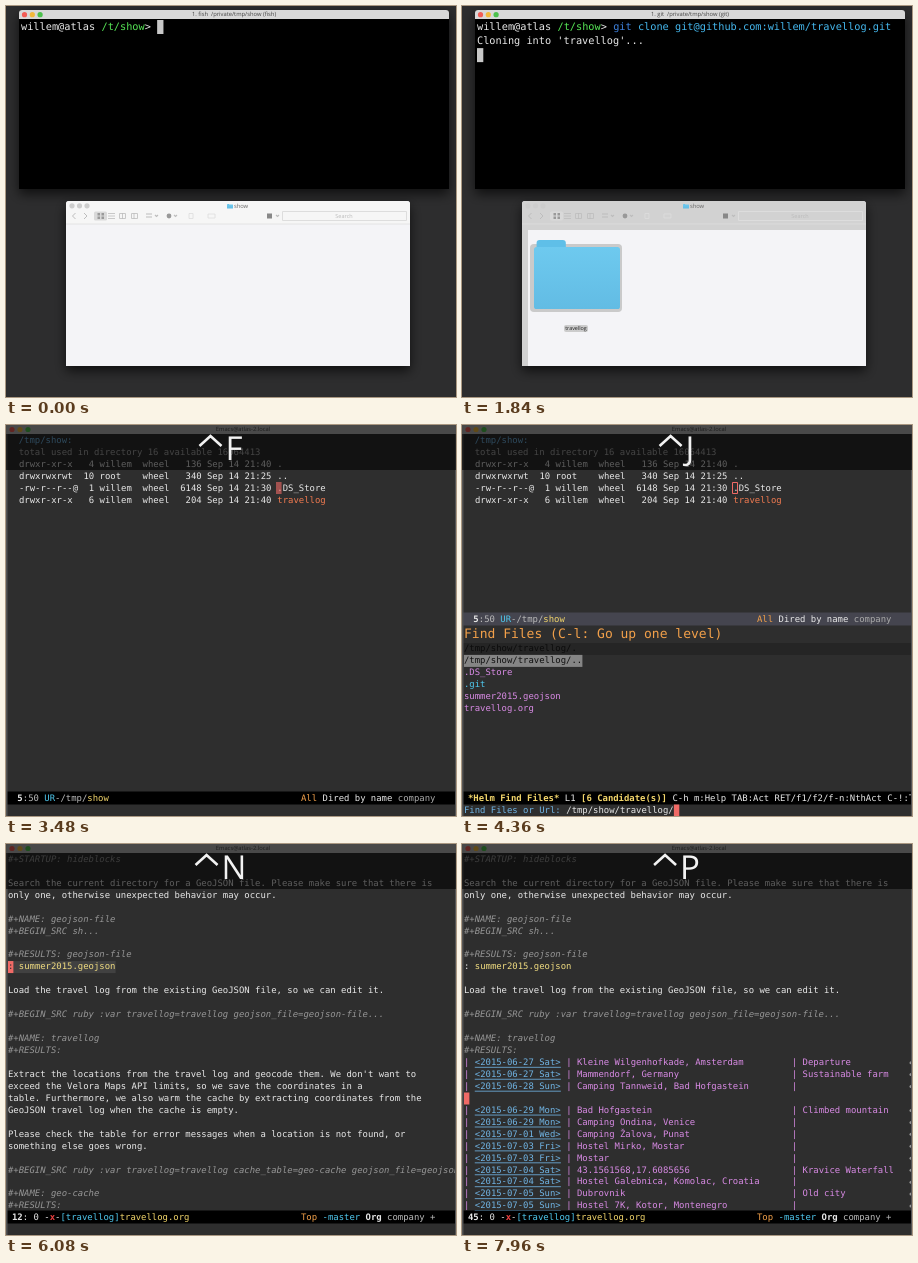
An HTML page with a canvas that plays this animation: 450x391 px, repeating every 8 s.

```html
<!DOCTYPE html>
<html lang="en">
<head>
<meta charset="utf-8">
<title>Travel log demo</title>
<style>
html, body { margin: 0; width: 100%; height: 100%; overflow: hidden; background: #2d2d2e; }
canvas { display: block; width: 450px; height: 391px; }
</style>
</head>
<body>
<canvas id="stage" width="450" height="391"></canvas>
<script>
const g = document.getElementById('stage').getContext('2d');
const MONO = '"DejaVu Sans Mono", monospace', SANS = '"Open Sans", sans-serif';
const WHITE = '#e8e8e8', GRAY = '#969696', VIOLET = '#d88ae4', BLUE = '#70b4e4', CYAN = '#4fc9ef',
  GOLD = '#f3d66b', ORANGE = '#f2a04a', RED = '#f06a66', BG = '#2e2e2e';
const LOOP = 8000, EM = 8.94, CW = EM * 0.602;

function box(x, y, w, h, fill) { g.fillStyle = fill; g.fillRect(x, y, w, h); }
function shape(fill, ...args) {
  g.fillStyle = fill;
  g.beginPath();
  g.roundRect(...args);
  g.fill();
}
function dot(x, y, r, fill) {
  g.fillStyle = fill;
  g.beginPath();
  g.arc(x, y, r, 0, 7);
  g.fill();
}
function path(d, color, width) {
  g.strokeStyle = color;
  g.lineWidth = width;
  g.stroke(new Path2D(d));
}
function label(s, x, y, size, color, align = 'center') {
  g.font = `${size}px ${SANS}`;
  g.textAlign = align;
  g.fillStyle = color;
  g.fillText(s, x, y);
}
// Monospaced line made of [text, colour, style] spans
function line(x, y, spans, size = EM) {
  g.textAlign = 'left';
  for (const [s, color = WHITE, style = ''] of spans) {
    const w = s.length * size * 0.602;
    g.font = `${style === 'link' ? '' : style} ${size}px ${MONO}`;
    g.fillStyle = color;
    g.fillText(s, x, y);
    if (style === 'link') g.fillRect(x, y + 4.2, w, 0.8);
    x += w;
  }
}

/* ---------- terminal and file window ---------- */

const PROMPT = [['willem@atlas '], ['/t/show', '#56e656'], ['> ']];
const COMMAND = 'git clone git@github.com:willem/travellog.git';
const OUTPUT = [
  [1640, "Cloning into 'travellog'..."],
  [2000, 'remote: Counting objects: 121, done.'],
  [2080, 'remote: Compressing objects: 100% (110/110), done.'],
  [2160, 'remote: Total 121 (delta 38), reused 86 (delta 3), pack-reused 0'],
  [2280, 'Receiving objects: 100% (121/121), 21.26 KiB | 0 bytes/s, done.'],
  [2360, 'Resolving deltas: 100% (38/38), done.'],
  [2440, 'Checking connectivity... done.'],
];

function panel(x, y, w, h, fill) {
  g.save();
  g.shadowColor = '#000a';
  g.shadowBlur = 12;
  g.shadowOffsetY = 5;
  shape(fill, x, y, w, h, [3, 3, 0, 0]);
  g.restore();
}
function lights(x, y, step, colors) { colors.forEach((c, i) => dot(x + i * step, y, 2.6, c)); }

function terminal(t) {
  panel(13, 4, 430, 179, '#000');
  shape('#d8d8d8', 13, 4, 430, 9, [3, 3, 0, 0]);
  lights(18.5, 8.7, 7.8, ['#f25c55', '#f2b93c', '#4cc04c']);
  const busy = t >= 1640 && t < 2520, app = busy ? 'git' : 'fish';
  label(`1. ${app}  /private/tmp/show (${app})`, 228, 8.8, 5.8, '#444');

  const size = 10.28, cw = size * 0.602, y = n => 21 + n * 14.06;
  const n = Math.max(0, Math.min(COMMAND.length, Math.ceil((t - 20) / 35)));
  line(15, y(0), [...PROMPT, [COMMAND.slice(0, Math.min(n, 3)), '#3f83e0'],
    [COMMAND.slice(3, Math.max(n, 3)), '#45b8ee']], size);
  const lines = OUTPUT.filter(o => t >= o[0]);
  lines.forEach((o, i) => line(15, y(i + 1), [[o[1]]], size));
  let row = lines.length ? lines.length + 1 : 0, col = lines.length ? 0 : 22 + n;
  if (t >= 2520) {
    line(15, y(row), PROMPT, size);
    col = 22;
  }
  const cx = 15 + col * cw, cy = y(row) - 7;
  if (t >= 2600) path(`M${cx + .5} ${cy + .5}h6v13h-6z`, '#aaa', 1);
  else box(cx, cy, 6.3, 14, '#c8c8c8');
}

function folder(x, y, w, h) {
  shape('#5fbfe8', x + w * .03, y, w * .34, h * .3, 3);
  const shade = g.createLinearGradient(0, y, 0, y + h);
  shade.addColorStop(0, '#6fcbf0');
  shade.addColorStop(1, '#62bce4');
  shape(shade, x, y + h * .1, w, h * .9, w * .03);
}

function toolbar(active) {
  const ink = active ? '#858585' : '#bdbdbd';
  path('M69.5 207l-3 3 3 3M78 207l3 3-3 3', ink, 1);
  shape(active ? '#8d8d8d' : '#d9d9d9', 88, 205.5, 13, 9, 1.5);
  for (const x of [91.5, 95.5]) for (const y of [207, 210.5]) box(x, y, 2.5, 2.5, active ? '#eee' : '#999');
  path('M102 207.5h7M102 210h7M102 212.5h7M113.5 207.5h6v5h-6zM116.5 207v6M125.5 207.5h6v5h-6zM128 207v6', ink, .8);
  path('M140 208h6M140 211h6M149 209l1.5 1.5 1.5-1.5M168 209l1.5 1.5 1.5-1.5M270 209l1.5 1.5 1.5-1.5', ink, 1.2);
  dot(163, 210, 2.4, active ? '#666' : '#999');
  box(261, 207.5, 5, 5, active ? '#666' : '#888');
  if (active) return;
  path('M60 218h344M183 207.5h4v5h-4zM202 208h7v4h-7z', '#ddd', .8);
  path('M276.5 205.5h124v9h-124z', '#ddd', 1);
  label('Search', 338, 210.3, 5.5, '#bbb');
}

function finder(t) {
  const filled = t >= 1720, active = t >= 2600, open = t >= 2920;
  panel(60, 195, 344, 165, '#f4f4f7');
  shape(filled ? '#d2d2d2' : '#f6f6f6', 60, 195, 344, filled && !open ? 29 : 23, [3, 3, 0, 0]);
  lights(66, 199.8, 7.5, active ? ['#f25c55', '#f2b93c', '#4cc04c'] : Array(3).fill('#cdcdcd'));
  toolbar(active);
  folder(open ? 217 : 221, 198, 6, 4.5);
  label(open ? 'travellog' : 'show', open ? 236 : 235, 200.3, 5.8, '#666');
  if (filled && !open) {
    box(60, 224, 6, 136, '#d2d2d2');
    shape('#cacaca', 68, 238, 92, 68, 4);
    folder(72, 234, 86, 69);
    shape('#ccc', 102, 319, 24, 7, 2);
    label('travellog', 114, 322.5, 5.4, '#222');
  }
  if (open) {
    const edge = '#d0d0d0';
    box(61, 224, 104, 96, edge);
    path('M84 300v30h80v-106M212 224v106h80v-68', edge, 4);
    g.fillStyle = edge;
    g.fill(new Path2D('M236 224C242 258 270 282 294 277V262C280 236 262 224 236 224z'));
    path('M142 248q9 1 16 7M263 247q8 1 14 6', '#777', .8);
    label('summer2015.geojson', 124, 342, 5.6, '#333');
    label('travellog.org', 251, 342, 5.6, '#333');
  }
}

function pointer(t) {
  if (t < 2560) return;
  const k = 1 - Math.pow(1 - Math.min(1, (t - 2560) / 200), 3);
  g.save();
  g.translate(250 - 171 * k, 384 - 129 * k);
  const arrow = new Path2D('M0 0V24L5.5 18.8 9.5 29 13.5 27.3 9.4 17.5H16.5z');
  g.fillStyle = '#000';
  g.fill(arrow);
  g.strokeStyle = '#fff';
  g.lineWidth = 1;
  g.stroke(arrow);
  g.restore();
}

/* ---------- editor ---------- */

const KEYS = [[3360, '^X'], [3480, '^F'],
  [3680, '^N'], [3800, '^N'], [3920, '^N'], [4160, '^J'],
  [4440, '^N'], [4520, '^N'], [4600, '^N'], [4720, '^N'], [4840, '↩'],
  [5000, '^N'], [5040, '^N'], [5080, '^N'], [5160, '^N'], [5200, '^N'], [5280, '^N'],
  [5480, '^C'], [5640, '^C'],
  [5920, '^N'], [6000, '^N'], [6080, '^N'], [6160, '^N'], [6240, '^N'], [6320, '^N'], [6380, '^N'],
  [6460, '^C'], [6560, '^C'], [6640, '^'],
  [7000, '^N'], [7080, '^N'], [7160, '^N'], [7240, '^N'], [7320, '^N'], [7400, '^N'], [7480, '^N'],
  [7640, '↩'], [7840, '^P']];
const downs = (from, t) => KEYS.filter(k => k[0] >= from && k[0] <= t && k[1] === '^N').length;

function keycast(t) {
  if (t < KEYS[0][0]) return;
  box(0, 0, 450, 45, '#0009');
  const key = KEYS.filter(k => k[0] <= t).pop()[1], letter = key.replace('^', '');
  g.font = `33px ${SANS}`;
  const lw = letter ? g.measureText(letter).width : 0, caret = key[0] === '^' ? 24 : 0;
  const gap = caret && lw ? 3 : 0, x = 214.5 - (caret + gap + lw) / 2;
  if (caret) path(`M${x + 1} ${letter ? 21 : 27}l11-10 11 10`, '#f2f2f2', 2.6);
  g.textBaseline = 'alphabetic';
  label(letter, x + caret + gap, 35, 33, '#f2f2f2', 'left');
  g.textBaseline = 'middle';
}

const meta = s => [[s, GRAY, 'italic']];
const say = s => [[s]];
const TRIP = [
  ['06-27 Sat', 'Kleine Wilgenhofkade, Amsterdam', 'Departure'],
  ['06-27 Sat', 'Mammendorf, Germany', 'Sustainable farm'],
  ['06-28 Sun', 'Camping Tannweid, Bad Hofgastein'],
  ['06-29 Mon', 'Bad Hofgastein', 'Climbed mountain'],
  ['06-29 Mon', 'Camping Ondina, Venice'],
  ['07-01 Wed', 'Camping Žalova, Punat'],
  ['07-03 Fri', 'Hostel Mirko, Mostar'],
  ['07-03 Fri', 'Mostar'],
  ['07-04 Sat', '43.1561568,17.6085656', 'Kravice Waterfall'],
  ['07-04 Sat', 'Hostel Galebnica, Komolac, Croatia'],
  ['07-05 Sun', 'Dubrovnik', 'Old city'],
  ['07-05 Sun', 'Hostel 7K, Kotor, Montenegro'],
  ['07-07 Tue', 'Tirana, Albania'],
].map(([day, place, note = '']) => [['| ', VIOLET], [`<2015-${day}>`, BLUE, 'link'],
  [` | ${place.padEnd(40)}| ${note}`, VIOLET]]);

function orgRows(t) {
  const trip = TRIP.slice();
  if (t >= 7640) trip.splice(3, 0, []);
  return [
    meta('#+STARTUP: hideblocks'), [],
    say('Search the current directory for a GeoJSON file. Please make sure that there is'),
    say('only one, otherwise unexpected behavior may occur.'), [],
    meta('#+NAME: geojson-file'), meta('#+BEGIN_SRC sh...'), [],
    ...(t < 5800 ? [] : [meta('#+RESULTS: geojson-file'), [[': '], ['summer2015.geojson', '#f0dc80']], []]),
    say('Load the travel log from the existing GeoJSON file, so we can edit it.'), [],
    meta('#+BEGIN_SRC ruby :var travellog=travellog geojson_file=geojson-file...'), [],
    meta('#+NAME: travellog'), meta('#+RESULTS:'),
    ...(t < 6640 ? [] : trip), [],
    say("Extract the locations from the travel log and geocode them. We don't want to"),
    say('exceed the Velora Maps API limits, so we save the coordinates in a'),
    say('table. Furthermore, we also warm the cache by extracting coordinates from the'),
    say('GeoJSON travel log when the cache is empty.'), [],
    say('Please check the table for error messages when a location is not found, or'),
    say('something else goes wrong.'), [],
    meta('#+BEGIN_SRC ruby :var travellog=travellog cache_table=geo-cache geojson_file=geojson-file...'), [],
    meta('#+NAME: geo-cache'), meta('#+RESULTS:'), [],
    say('Combine the travel log and geocode cache to construct a GeoJSON file. After'),
    say('that, we save the file.'),
  ].slice(0, 30);
}

function modeline(y, bg, left, right) {
  box(0, y - 7, 450, 13, bg);
  line(6, y, left);
  if (right) line(295, y, right);
}

function org(t) {
  // The cursor skips the folded lines of each code block
  let row = downs(5000, t);
  if (t >= 7640) row++;
  if (t >= 7840) row--;
  const number = row + (row > 13 ? 25 : row > 6 ? 3 : 1), rowY = i => 15.5 + i * 11.95;
  const rows = orgRows(t), y = rowY(row);
  const width = rows[row].reduce((n, [s]) => n + s.length, 0) * CW;
  box(2, y - 6, width, 12, '#414141');
  rows.forEach((r, i) => {
    line(2, rowY(i), r);
    if (r.length > 2) dot(449, rowY(i), 1.5, '#999');
  });
  box(2, y - 6, CW, 12, RED);
  if (width) line(2, y, [[rows[row][0][0][0], BG, rows[row][0][2]]]);
  const dirty = t >= 5800;
  modeline(373.5, '#000',
    [[String(number).padStart(2), WHITE, 'bold'], [': 0 -'], [dirty ? 'x' : ' ', '#f04040', 'bold'], ['-'],
      ['[travellog]', CYAN], ['travellog.org', GOLD]],
    [['Top ', ORANGE], ['-master ', CYAN], ['Org ', WHITE, 'bold'], ['company +', '#bbb']]);
  if (t >= 6640 && t < 7000) line(2, 385.3, say('Code block evaluation complete.'));
}

const FILES = [['drwxr-xr-x ', 4, 'willem', 136, '40', '.'], ['drwxrwxrwt ', 10, 'root', 340, '25', '..'],
  ['-rw-r--r--@', 1, 'willem', 6148, '30', '.DS_Store'], ['drwxr-xr-x ', 6, 'willem', 204, '40', 'travellog']];

function dired(helm) {
  line(2, 15.5, [['  /tmp/show:', BLUE]]);
  line(2, 27.5, [['  total used in directory 16 available 16064413', '#aaa']]);
  FILES.forEach(([mode, links, owner, size, min, name], i) => line(13, 39.5 + i * 12, [
    [`${mode}${String(links).padStart(3)} ${owner.padEnd(8)}wheel ${String(size).padStart(5)} Sep 14 21:${min} `],
    [name, name === 'travellog' ? '#f07a50' : WHITE]]));
  if (helm) path('M270.5 57.5h5v11h-5z', RED, 1);
  else box(270, 57, 5.6, 12, '#f06a6699');
  modeline(helm ? 194.5 : 373.5, helm ? '#45454f' : '#000',
    [[' 5', WHITE, 'bold'], [':50 ', '#bbb'], ['UR', CYAN], ['-/tmp/', '#bbb'], ['show', GOLD]],
    [['All ', ORANGE], ['Dired by name ', WHITE], ['company', '#aaa']]);
}

function helm(t) {
  const inside = t >= 4200, dir = inside ? '/tmp/show/travellog/' : '/tmp/show/';
  const names = [dir + '.', dir + '..', '.DS_Store',
    ...(inside ? ['.git', 'summer2015.geojson', 'travellog.org'] : ['travellog'])];
  const pick = inside ? 1 + downs(4400, t) : downs(3600, t);
  box(0, 201, 450, 190, BG);
  line(2, 209.5, [['Find Files (C-l: Go up one level)', ORANGE]], 13);
  box(0, 218, 450, 12, '#252525');
  names.forEach((s, i) => {
    const y = 224 + i * 11.9, on = i === pick, dotted = i < 2;
    if (on || i === 1) box(2, y - 6, s.length * CW, 12, on ? '#858585' : '#555');
    const color = dotted ? '#0c0c0c' : s === '.git' || s === 'travellog' ? CYAN : VIOLET;
    line(2, y, [[s, on ? '#111' : color]]);
  });
  modeline(373.5, '#000', [['*Helm Find Files*', GOLD, 'bold'], [' L' + (inside ? pick : pick + 1) + ' '],
    [`[${names.length} Candidate(s)]`, GOLD, 'bold'],
    [' C-h m:Help TAB:Act RET/f1/f2/f-n:NthAct C-!:Tog', WHITE]]);
  line(2, 385.3, [['Find Files or Url: ', BLUE], [dir]]);
  box(2 + (19 + dir.length) * CW, 379.5, CW, 11.5, RED);
}

function editor(t) {
  box(0, 0, 450, 391, BG);
  if (t < 4880) {
    dired(t >= 3560);
    if (t >= 3560) helm(t);
  } else org(t);
  box(0, 9, 1.5, 382, '#555');
  box(449, 9, 1, 382, '#555');
  box(0, 0, 450, 9, '#b8b8b8');
  lights(6, 4.5, 8, ['#f25c55', '#f2b93c', '#4cc04c']);
  label('Emacs@atlas-2.local', 237, 4.8, 5.8, '#444');
  keycast(t);
}

function draw() {
  const t = performance.now() % LOOP;
  g.textBaseline = 'middle';
  g.textRendering = 'geometricPrecision';
  if (t < 3160) {
    box(0, 0, 450, 391, '#2d2d2e');
    terminal(t);
    finder(t);
    pointer(t);
  } else editor(t);
  requestAnimationFrame(draw);
}
draw();
</script>
</body>
</html>
```
